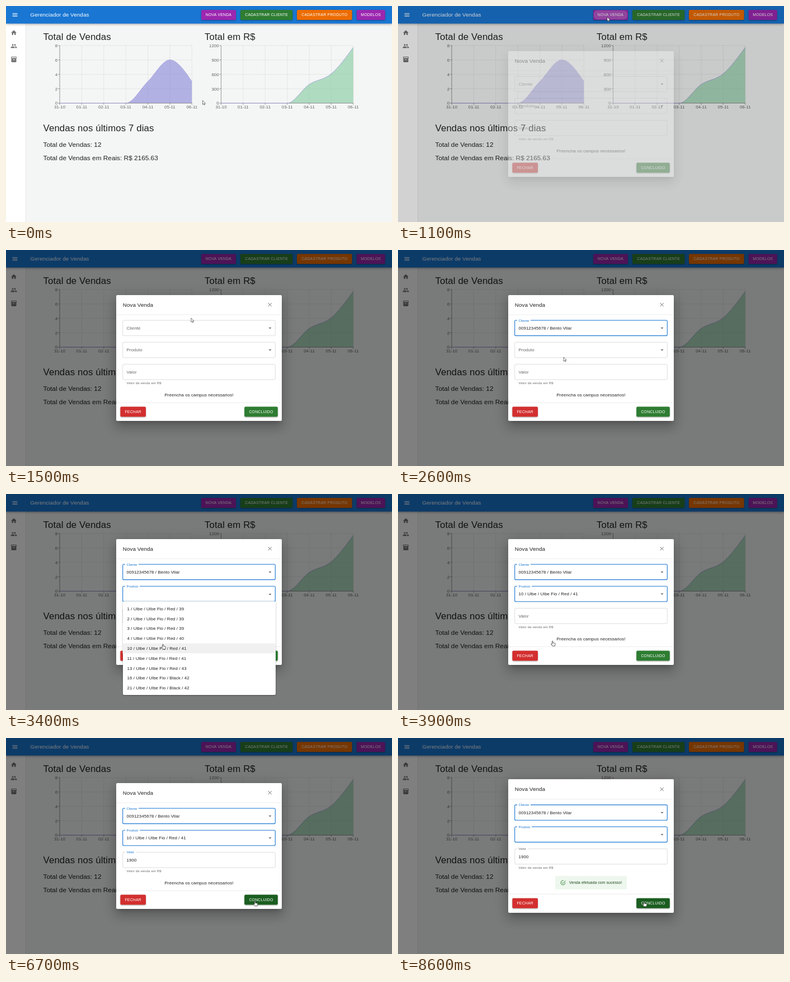
Animation of 690x388 px, one loop 9.1 s. Source, as an HTML page:

```html
<!DOCTYPE html>
<html lang="pt-BR">
<head>
<meta charset="utf-8">
<title>Gerenciador de Vendas</title>
<style>
html, body { margin: 0; width: 100%; height: 100%; overflow: hidden; background: #f4f5f5; }
#stage { position: relative; width: 690px; height: 388px; overflow: hidden; }
svg, #shade, #dialog, .paper { position: absolute; left: 0; top: 0; }
svg { width: 690px; height: 388px; overflow: visible; font-family: "Liberation Sans", Arial, sans-serif; }
#shade { width: 690px; height: 388px; background: #000; }
.paper { background: #fff; border-radius: 2px; }
#sheet { left: 197px; width: 296.3px;
  box-shadow: 0 5.5px 7.5px -3.5px rgba(0,0,0,.2), 0 12px 19px 1.5px rgba(0,0,0,.14), 0 4.5px 23px 4px rgba(0,0,0,.12); }
.list { left: 208.5px; width: 273px;
  box-shadow: 0 1px 1px rgba(0,0,0,.2), 0 .5px 3px rgba(0,0,0,.25); }
text { fill: rgba(0,0,0,.87); }
.h4 { font-size: 16.77px; letter-spacing: .00735em; }
.h5 { font-size: 11.84px; }
.h6 { font-size: 9.87px; letter-spacing: .0075em; }
.body { font-size: 7.9px; letter-spacing: .00938em; }
.small { font-size: 5.92px; letter-spacing: .00938em; }
.help { font-size: 5.92px; letter-spacing: .0333em; }
.note { font-size: 6.906px; letter-spacing: .01071em; }
.btn { font-size: 6.906px; letter-spacing: .02857em; text-anchor: middle; }
.axis { font-size: 7.9px; }
.axis, .soft { fill: #666; }
.mid { text-anchor: middle; }
.end { text-anchor: end; }
.white { fill: #fff; }
.box { fill: none; stroke: #c4c4c4; stroke-width: .6; }
.blue .box { stroke: #1976d2; stroke-width: 1.1; }
.blue .tag, .tint .tag { fill: #1976d2; }
.raised { filter: drop-shadow(0 1px 1px rgba(0,0,0,.35)); }
.rule { stroke: #e0e0e0; stroke-width: .6; }
</style>
</head>
<body>
<div id="stage">
  <svg id="page"></svg>
  <div id="shade"></div>
  <div id="dialog">
    <div class="paper" id="sheet"></div>
    <svg id="form"></svg>
    <div class="paper list" id="clientList"></div>
    <div class="paper list" id="productList"></div>
    <svg id="options"></svg>
  </div>
  <svg id="pointer"></svg>
</div>
<script>
const LOOP = 9100, STEP = 100, U = 0.4933, ROW = 36 * U;
const CLIENT = '00912345678 / Bento Vilar';
const item = (id, color, size) => `${id} / Ulbe / Ulbe Fio / ${color} / ${size}`;
const PRODUCTS = [
  item(1, 'Red', 39), item(2, 'Red', 39), item(3, 'Red', 39), item(4, 'Red', 40), item(10, 'Red', 41),
  item(11, 'Red', 41), item(13, 'Red', 43), item(16, 'Black', 42), item(21, 'Black', 42)
];
const $ = id => document.getElementById(id);

// Drawing helpers
const text = (x, y, cls, str, id = '') => `<text x="${x}" y="${y}" class="${cls}" id="${id}">${str}</text>`;
const rect = (x, y, w, h, fill, extra = '') =>
  `<rect x="${x}" y="${y}" width="${w}" height="${h}" fill="${fill}" ${extra}/>`;
const line = (x1, y1, x2, y2, extra) => `<path d="M${x1} ${y1}L${x2} ${y2}" ${extra}/>`;
const icon = (cx, cy, body, fill) =>
  `<g transform="translate(${cx - 12 * U} ${cy - 12 * U}) scale(${U})" fill="${fill}">${body}</g>`;
const button = (x, y, w, label, fill, id = '') =>
  rect(x, y, w, 18, fill, `rx="2" class="raised" id="${id}"`) + text(x + w / 2, y + 11.4, 'btn white', label);

// Monotone cubic through evenly spaced points
function curve(pts) {
  const n = pts.length - 1, h = pts[1][0] - pts[0][0];
  const s = pts.slice(1).map((p, i) => (p[1] - pts[i][1]) / h);
  const m = pts.map((_, i) => {
    if (i === 0 || i === n) return 0;
    const a = s[i - 1], b = s[i];
    return (Math.sign(a) + Math.sign(b)) * Math.min(Math.abs(a), Math.abs(b), Math.abs(a + b) / 4) || 0;
  });
  m[0] = (3 * s[0] - m[1]) / 2;
  m[n] = (3 * s[n - 1] - m[n - 1]) / 2;
  let d = 'M' + pts[0];
  for (let i = 0; i < n; i++) {
    const [x, y] = pts[i], [X, Y] = pts[i + 1];
    d += `C${x + h / 3},${y + m[i] * h / 3},${X - h / 3},${Y - m[i + 1] * h / 3},${X},${Y}`;
  }
  return d;
}

function chart(x, max, values, fill) {
  const top = 71, bottom = 174.5, w = 236.3, dx = w / 6;
  const grid = 'stroke="#c4c4c4" stroke-width=".6" stroke-dasharray="1.5 1.5"';
  const ink = 'stroke="#666" stroke-width=".6"';
  let lines = '', marks = '';
  for (let i = 0; i <= 4; i++) {
    const y = bottom - (bottom - top) * i / 4;
    lines += line(x, y, x + w, y, grid);
    marks += line(x - 3, y, x, y, ink) + text(x - 3.9, y + 2.9, 'axis end', max * i / 4);
  }
  ['31-10', '01-11', '02-11', '03-11', '04-11', '05-11', '06-11'].forEach((day, i) => {
    const px = x + dx * i;
    lines += line(px, top, px, bottom, grid);
    marks += line(px, bottom, px, bottom + 3, ink) + text(px, 184, 'axis mid', day);
  });
  const d = curve(values.map((v, i) => [x + dx * i, bottom - (bottom - top) * v / max]));
  return lines + `<path d="${d}V${bottom}H${x}Z" fill="${fill}" fill-opacity=".6"/>` +
    line(x, top, x, bottom, ink) + line(x, bottom, x + w, bottom, ink) + marks +
    `<path d="${d}" fill="none" stroke="#8884d8" stroke-width=".6"/>`;
}

const gray = '#757575';
$('page').innerHTML =
  rect(0, 0, 690, 388, '#f4f5f5') + rect(0, 0, 35, 388, '#fff') + rect(35, 0, .6, 388, '#dcdcdc') +
  rect(0, 0, 690, 31.6, '#1976d2', 'style="filter:drop-shadow(0 1px 2px rgba(0,0,0,.35))"') +
  icon(16, 16, '<path d="M3 18h18v-2H3zm0-5h18v-2H3zm0-7v2h18V6z"/>', '#fff') +
  text(43.3, 19.2, 'h6 white', 'Gerenciador de Vendas') +
  button(349, 7, 62, 'NOVA VENDA', '#9c27b0', 'newSale') +
  rect(350, 8, 60, 16, '#fff', 'rx="6" opacity=".2" id="ripple"') +
  button(419, 7, 93.3, 'CADASTRAR CLIENTE', '#2e7d32') +
  button(520, 7, 98.6, 'CADASTRAR PRODUTO', '#ed6c02') +
  button(626.7, 7, 51, 'MODELOS', '#9c27b0') +
  icon(14, 48, '<path d="M10 20v-6h4v6h5v-8h3L12 3 2 12h3v8z"/>', gray) +
  icon(14, 72, '<circle cx="8" cy="8" r="3"/><circle cx="16" cy="8" r="3"/>' +
    '<path d="M8 13c-2.3 0-7 1.2-7 3.5V19h14v-2.500c0-2.300-4.700-3.500-7-3.500zM16 13l-1 .1c1.200.8 2 1.900 2 3.400V19h6v-2.500c0-2.300-4.700-3.500-7-3.500z"/>', gray) +
  icon(14, 96, '<path fill-rule="evenodd" d="M4 2h16q2 0 2 2v3q0 1-1 1.700V20q0 2-2 2H5q-2 0-2-2V8.700Q2 8 2 7V4q0-2 2-2zM4 4v3h16V4zM9 12v2h6v-2z"/>', gray) +
  text(66.6, 61, 'h4', 'Total de Vendas') + text(355, 61, 'h4', 'Total em R$') +
  chart(96, 8, [0, 0, 0, 0, 3, 6, 3], '#8884d8') +
  chart(384.5, 1200, [0, 0, 0, 0, 390, 612, 1163.63], '#82ca9d') +
  text(66.6, 224.6, 'h4', 'Vendas nos últimos 7 dias') +
  text(66.6, 253, 'h5', 'Total de Vendas: 12') +
  text(66.6, 276.6, 'h5', 'Total de Vendas em Reais: R$ 2165.63');

const field = (id, y, label, notch, arrow) => `<g id="${id}">` +
  rect(208.7, y, 272.6, 27.6, 'none', 'rx="2" class="box"') +
  `<g class="up">${rect(213, y - 1.5, notch, 3, '#fff')}${text(215.5, y + 2.2, 'small soft tag', label)}</g>` +
  text(215.5, y + 16.7, 'body soft down', label) + text(215.5, y + 16.7, 'body value', '') +
  (arrow ? `<path class="arrow" d="M-2.5-1.200h5l-2.500 2.500z" fill="#616161"/>` : '') + '</g>';

$('form').innerHTML = '<g id="upper">' +
  text(208.7, 101.6, 'h6', 'Nova Venda') +
  icon(471.6, 98.2, '<path d="M5.700 5.700L18.300 18.300M18.300 5.700L5.700 18.300" stroke="#6b6b6b" stroke-width="2"/>', 'none') +
  line(197, 116.3, 493.3, 116.3, 'class="rule"') +
  field('client', 126.3, 'Cliente', 24, true) +
  field('product', 165.7, 'Produto', 26, true) +
  field('price', 205.2, 'Valor', 19, false) +
  '<path id="spin" d="M468.600 217.700h4.400l-2.200-2.500zM468.600 220h4.400l-2.200 2.500z" fill="#505050"/>' +
  rect(0, 214.3, .7, 9, '#222', 'id="caret"') +
  text(215.5, 241, 'help soft', 'Valor da venda em R$') + '</g>' +
  text(345, 262.6, 'body mid', 'Preencha os campus necessarios!', 'hint') +
  '<g id="alert">' + rect(281, 247.8, 128, 24, '#edf7ed', 'rx="2"') +
  icon(295, 259.9, '<path d="M20 12a8 8 0 1 1-5.800-7.700M8 11l4 4L21 5" stroke="#2e7d32" stroke-width="2"/>', 'none') +
  text(306, 262.3, 'note" style="fill:#1e4620', 'Venda efetuada com sucesso!') + '</g>' +
  '<g id="footer">' + line(197, 274.2, 493.3, 274.2, 'class="rule"') +
  button(204.4, 281.6, 45.6, 'FECHAR', '#d32f2f') +
  button(426.2, 281.6, 59.6, 'CONCLUIDO', '#2e7d32', 'done') + '</g>';

const LISTS = { client: { top: 154, rows: [CLIENT] }, product: { top: 193.3, rows: PRODUCTS } };
$('options').innerHTML = rect(208.5, 0, 273, ROW, '#f0f0f0', 'id="hover"') +
  Object.entries(LISTS).map(([key, l]) => {
    const box = $(key + 'List').style;
    box.top = l.top + 'px';
    box.height = l.rows.length * ROW + 8 + 'px';
    return `<g id="${key}Rows">` + l.rows.map((r, i) =>
      text(216.5, l.top + 4 + ROW * (i + .5) + 2.8, 'body', r)).join('') + '</g>';
  }).join('');

$('pointer').innerHTML =
  '<path id="arrow" d="M0 0V7.200L1.700 5.700 2.800 8.200 4 7.700 2.900 5.300H5.100Z" fill="#fff" stroke="#222" stroke-width=".6"/>' +
  '<path id="hand" d="M-.8.600Q0-.500.800.600V3.500L4 4Q5 4.200 5 5.200L4.200 9H-.300L-2.700 5.800Q-2.600 4.600-.800 5.800Z" fill="#fff" stroke="#222" stroke-width=".7"/>' +
  '<path id="beam" d="M-1.500-3.500Q0-3.500 0-3V3Q0 3.500-1.500 3.500M1.500-3.500Q0-3.500 0-3M0 3Q0 3.500 1.500 3.500" fill="none" stroke="#222" stroke-width=".7"/>';

// Pointer path: time, x, y, shape
const PATH = [
  [0, 351.5, 169.7, 'arrow'], [100, 351.5, 169.7, 'arrow'], [900, 376, 16, 'hand'],
  [1100, 374, 20, 'arrow'], [1200, 357.5, 75, 'arrow'], [1600, 322, 138, 'beam'],
  [1900, 318, 141, 'beam'], [2100, 300, 165, 'hand'], [2400, 297, 167, 'hand'],
  [2500, 296, 185, 'arrow'], [2600, 296, 192.5, 'arrow'], [2700, 297, 182, 'beam'],
  [2900, 297, 182, 'beam'], [3000, 294, 200, 'hand'], [3400, 280.5, 269.8, 'hand'],
  [3800, 280.5, 272, 'hand'], [4000, 272, 256, 'arrow'], [4300, 257.3, 227, 'beam'],
  [6100, 257.3, 227, 'beam'], [6300, 330, 255, 'arrow'], [6600, 445, 292.8, 'hand'],
  [7500, 445, 292.8, 'hand'], [7700, 439, 293.2, 'hand'], [8500, 439, 293.2, 'hand'],
  [8600, 440, 293.7, 'hand'], [LOOP, 440, 293.7, 'hand']
];

function pointerAt(t) {
  const i = PATH.findIndex(k => k[0] > t);
  const [ta, xa, ya, shape] = PATH[i - 1], [tb, xb, yb] = PATH[i];
  const k = (t - ta) / (tb - ta);
  return { x: xa + (xb - xa) * k, y: ya + (yb - ya) * k, shape };
}

const show = (el, on) => { el.style.visibility = on ? 'visible' : 'hidden'; };
const move = (id, x, y) => $(id).setAttribute('transform', `translate(${x} ${y})`);

function setField(id, y, look, floating, value, open) {
  const g = $(id), arrow = g.querySelector('.arrow');
  g.setAttribute('class', look);
  show(g.querySelector('.up'), floating);
  show(g.querySelector('.down'), !floating);
  g.querySelector('.value').textContent = value;
  if (arrow) arrow.setAttribute('transform', `translate(472 ${y}) rotate(${open ? 180 : 0})`);
}

function render(t) {
  const within = (a, b) => t >= a && t < b;
  const fade = t < 1100 ? 0 : t < 1200 ? .35 : t < 1300 ? .87 : 1;
  const sent = t >= 6900, grow = sent ? 6.2 : 0;
  const p = pointerAt(t);

  $('shade').style.opacity = fade * .5;
  $('dialog').style.opacity = fade;
  $('newSale').setAttribute('fill', within(800, 1100) ? '#7b1fa2' : '#9c27b0');
  show($('ripple'), within(1000, 1300));

  $('sheet').style.top = 80.6 - grow + 'px';
  $('sheet').style.height = 226.8 + 2 * grow + 'px';
  move('upper', 0, -grow);
  move('footer', 0, grow);
  show($('hint'), !sent);
  show($('alert'), sent);

  const open = { client: within(1800, 2400), product: within(2900, 3800) };
  const typed = t < 5000 ? '' : t < 5300 ? '19' : t < 5500 ? '190' : '1900';
  const typing = within(4400, 6600);
  setField('client', 140.5, t >= 1700 ? 'blue' : '', t >= 1700, t >= 2400 ? CLIENT : '', open.client);
  setField('product', 179.8, t >= 2800 ? 'blue' : '', t >= 2800, within(3800, 7200) ? PRODUCTS[4] : '', open.product);
  setField('price', 0, typing ? 'blue' : within(6600, 6900) ? 'tint' : '', t >= 4400, typed, false);
  show($('spin'), typing);
  show($('caret'), within(4400, 4800) || within(5000, 6600));
  $('caret').setAttribute('x', 215.7 + 4.46 * typed.length);
  $('done').setAttribute('fill', t >= 6600 ? '#1b5e20' : '#2e7d32');

  let hover = -1;
  for (const key in LISTS) {
    const l = LISTS[key];
    show($(key + 'List'), open[key]);
    show($(key + 'Rows'), open[key]);
    const row = Math.floor((p.y - l.top - 4) / ROW);
    if (open[key] && row >= 0 && row < l.rows.length) hover = l.top + 4 + row * ROW;
  }
  show($('hover'), hover >= 0);
  $('hover').setAttribute('y', hover);

  for (const shape of ['arrow', 'hand', 'beam']) {
    show($(shape), shape === p.shape);
    move(shape, p.x, p.y);
  }
}

const start = performance.now();
function tick() {
  const t = (performance.now() - start) % LOOP;
  render(Math.floor(t / STEP) * STEP);
  requestAnimationFrame(tick);
}
tick();
</script>
</body>
</html>
```
